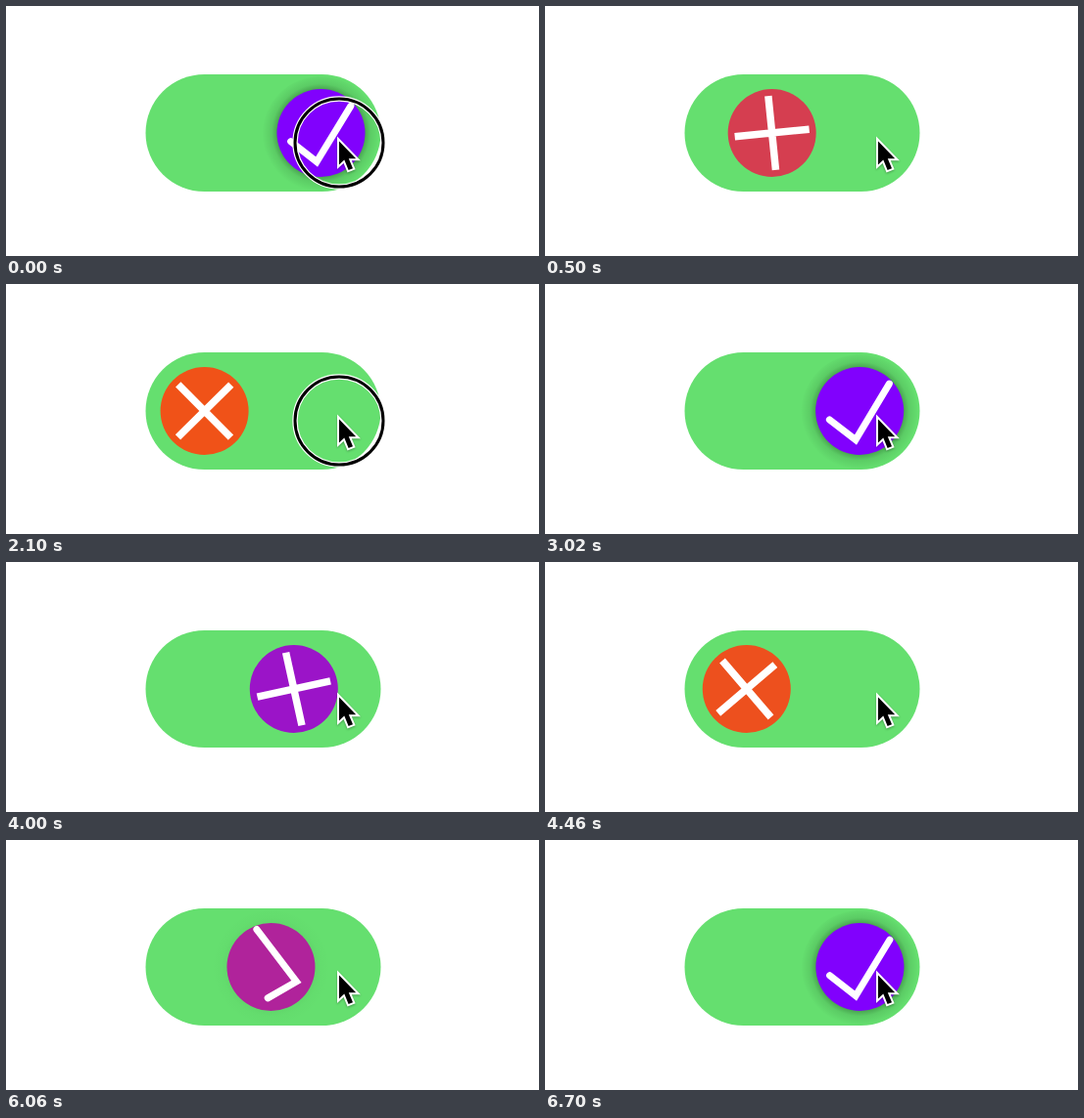
Write an HTML page that moves like this. It is 544x256 px and loops after 6720 ms.

```html
<!DOCTYPE html>
<html lang="en">
<head>
<meta charset="utf-8">
<title>Toggle switch</title>
<style>
html, body { margin: 0; width: 100%; height: 100%; overflow: hidden; background: #fff; }
svg { display: block; width: 544px; height: 256px; }
</style>
</head>
<body>
<svg viewBox="0 0 544 256" width="544" height="256">
  <defs>
    <radialGradient id="shade" gradientUnits="userSpaceOnUse" cx="0" cy="0" r="60">
      <stop offset=".72" stop-color="#143c18" stop-opacity=".42"/>
      <stop offset=".84" stop-color="#143c18" stop-opacity=".12"/>
      <stop offset="1" stop-color="#143c18" stop-opacity="0"/>
    </radialGradient>
    <clipPath id="track"><rect x="142.5" y="70" width="240" height="120" rx="60"/></clipPath>
  </defs>
  <rect x="142.5" y="70" width="240" height="120" rx="60" fill="#65df6f"/>
  <g clip-path="url(#track)">
    <g id="knob">
      <circle id="shadow" cy="2" r="60" fill="url(#shade)"/>
      <circle id="disc" r="45"/>
      <g id="icon" fill="none" stroke="#fff">
        <path id="check" d="M-31 8L-5 29.5L31-27" stroke-width="7" stroke-linecap="round"/>
        <path id="cross" d="M-27-27L27 27M27-27L-27 27" stroke-width="7.5"/>
      </g>
    </g>
  </g>
  <g id="ring" fill="none">
    <circle cx="340" cy="140" r="45" stroke="#fff" stroke-width="5.4"/>
    <circle cx="340" cy="140" r="45" stroke="#000" stroke-width="3"/>
  </g>
  <path d="M340 138.5V162.5L345.3 157.6L349.6 168L354 166.2L349.8 156.2H357.2Z"
    fill="#000" stroke="#fff" stroke-width="4" paint-order="stroke"
    style="filter:drop-shadow(0 1px 1px rgba(0,0,0,.3))"/>
</svg>
<script>
const LOOP = 6720, ROLL = 161, LEFT = 202.4, RIGHT = 322.4;
const ON = [128, 0, 255], OFF = [240, 82, 24];
// each click: press time, release time, state afterwards
const clicks = [
  { down: 0, up: 180, on: false },
  { down: 2000, up: 2220, on: true },
  { down: 3640, up: 3860, on: false },
  { down: 5600, up: 5820, on: true }
];
const $ = id => document.getElementById(id);
const [knob, shadow, disc, icon, check, cross, ring] =
  ['knob', 'shadow', 'disc', 'icon', 'check', 'cross', 'ring'].map($);
const show = (el, on) => el.setAttribute('visibility', on ? 'visible' : 'hidden');

// share of the travel still ahead: a smooth start and a long, slow settle
function remaining(ms) {
  const s = Math.max(0, ms - 10) / 1000, x = 13 * s;
  return 0.975 * Math.exp(-x) * (1 + x + x * x / 2) + 0.025 * Math.exp(-s / 0.7);
}

function draw(t) {
  let last = clicks[clicks.length - 1], age = t + LOOP - last.up;
  for (const c of clicks) if (t >= c.up) { last = c; age = t - c.up; }
  const rest = remaining(age);
  const on = last.on ? 1 - rest : rest;
  const rgb = ON.map((v, i) => Math.round(OFF[i] + (v - OFF[i]) * on));

  knob.setAttribute('transform', `translate(${LEFT + (RIGHT - LEFT) * on} 130)`);
  icon.setAttribute('transform', `rotate(${(last.on ? -ROLL : ROLL) * rest})`);
  disc.setAttribute('fill', `rgb(${rgb})`);
  shadow.setAttribute('opacity', last.on ? Math.max(0, on * 2 - 1) : Math.max(0, on * 5 - 4));
  show(check, last.on);
  show(cross, !last.on);
  show(ring, clicks.some(c => t >= c.down && t < c.up));
}

let start = null;
function tick(now) {
  if (start === null) start = now;
  draw((now - start) % LOOP);
  requestAnimationFrame(tick);
}
draw(0);
requestAnimationFrame(tick);
</script>
</body>
</html>
```
